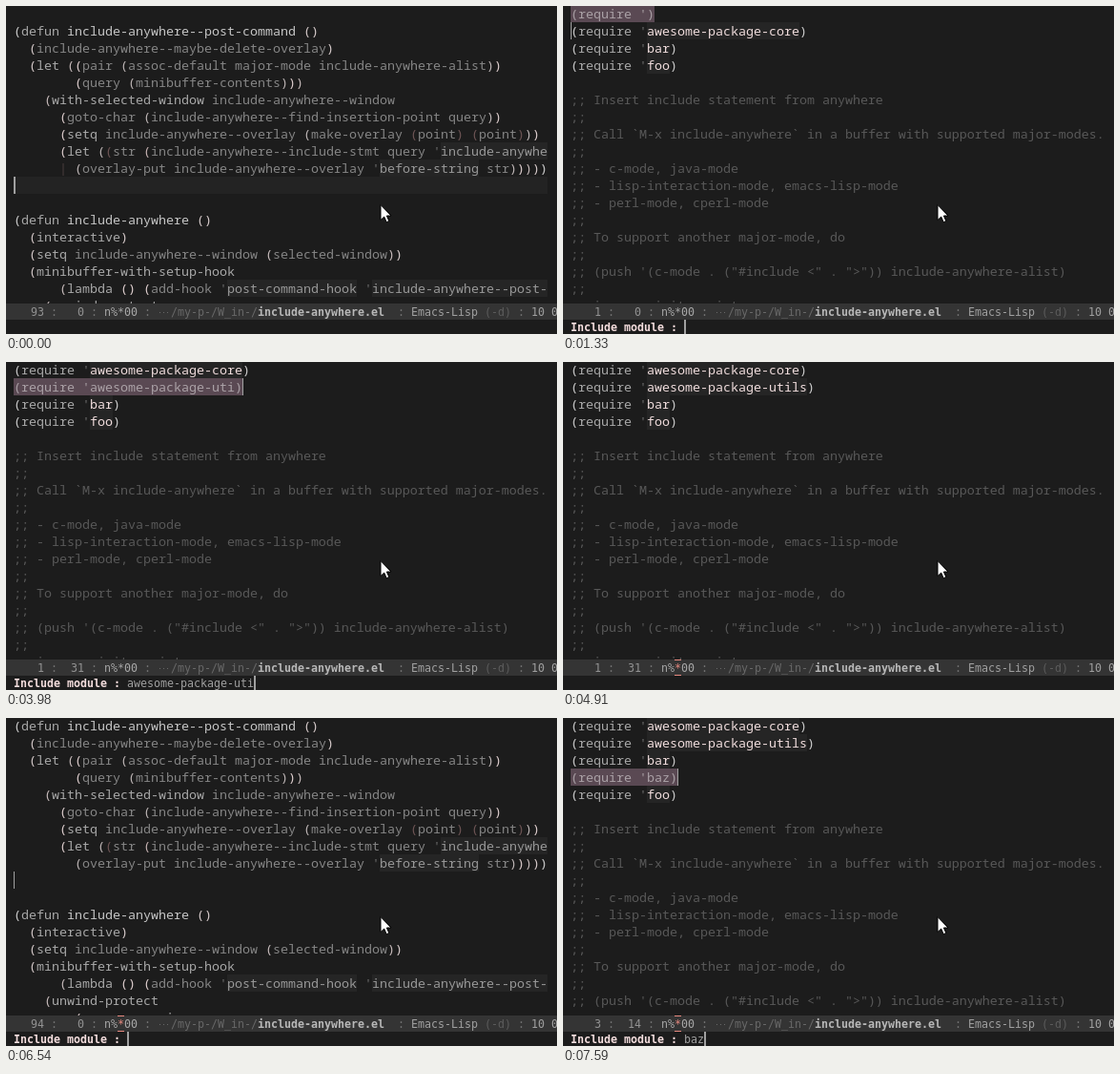
Animation, 578 px wide and 344 px high, one loop 8000 ms. Source, as an HTML page with a canvas:

```html
<!DOCTYPE html>
<html lang="en">
<head>
<meta charset="utf-8">
<title>Include anywhere</title>
<style>
html, body { margin: 0; width: 100%; height: 100%; overflow: hidden; background: #1c1c1c; }
canvas { display: block; }
</style>
</head>
<body>
<canvas id="stage" width="578" height="344"></canvas>
<script>
const ctx = document.getElementById('stage').getContext('2d');
const LOOP = 8000;
const LEFT = 8, RIGHT = 568, CW = 8, LH = 18, MODE_Y = 312, MINI_Y = 329;
const CODE_FONT = '13.333px "Noto Sans Mono", monospace';
const SMALL_FONT = '11.63px "DejaVu Sans Mono", monospace';
const C = {
  bg: '#1c1c1c', line: '#232323', box: '#252525', mode: '#343434',
  text: '#858585', keyword: '#a8a8a8', name: '#c6c6c6', quote: '#6c6c6c',
  quoted: '#989898', module: '#efdcdc', comment: '#585858', guide: '#4a3f3f',
  overlay: '#5a4953', overlayText: '#aaa1a6', cursor: '#a0a0a0', prompt: '#f5dede',
  alert: '#e88a80'
};
const PARENS = ['#d0d0d0', '#d8cccc', '#c8bcbc', '#e0d0d0', '#c0b8b8', '#6e5555', '#c8b4b4'];
const KEYWORDS = ['defun', 'let', 'setq', 'with-selected-window', 'interactive', 'lambda',
  'minibuffer-with-setup-hook', 'unwind-protect', 'save-excursion', 'require'];

const code = `
(defun include-anywhere--post-command ()
  (include-anywhere--maybe-delete-overlay)
  (let ((pair (assoc-default major-mode include-anywhere-alist))
        (query (minibuffer-contents)))
    (with-selected-window include-anywhere--window
      (goto-char (include-anywhere--find-insertion-point query))
      (setq include-anywhere--overlay (make-overlay (point) (point)))
      (let ((str (include-anywhere--include-stmt query 'include-anywhere-alist)))
        (overlay-put include-anywhere--overlay 'before-string str)))))


(defun include-anywhere ()
  (interactive)
  (setq include-anywhere--window (selected-window))
  (minibuffer-with-setup-hook
      (lambda () (add-hook 'post-command-hook 'include-anywhere--post-command))
    (unwind-protect
        (save-excursion`.split('\n');

const comments = `
;; Insert include statement from anywhere
;;
;; Call \`M-x include-anywhere\` in a buffer with supported major-modes.
;;
;; - c-mode, java-mode
;; - lisp-interaction-mode, emacs-lisp-mode
;; - perl-mode, cperl-mode
;;
;; To support another major-mode, do
;;
;; (push '(c-mode . ("#include <" . ">")) include-anywhere-alist)
;;
;; in your init script.`.split('\n');

const CORE = 'awesome-package-core', UTILS = 'awesome-package-utils';

// Split lisp lines into coloured pieces, carrying paren depth across lines.
function tokenize(lines) {
  let depth = 0;
  return lines.map(line => {
    const out = [];
    let last = '';
    for (const m of line.matchAll(/[()']|[^()'\s]+/g)) {
      const s = m[0], tok = { s, col: m.index };
      if (s === '(') tok.color = PARENS[depth++ % PARENS.length];
      else if (s === ')') tok.color = PARENS[--depth % PARENS.length];
      else if (s === "'") tok.color = C.quote;
      else if (last === "'") {
        tok.boxed = true;
        tok.color = line.startsWith('(require') ? C.module : C.quoted;
      }
      else if (last === 'defun') tok.color = C.name;
      else tok.color = KEYWORDS.includes(s) ? C.keyword : C.text;
      last = s;
      out.push(tok);
    }
    return out;
  });
}

const codeTokens = tokenize(code);
const requireLine = name => `(require '${name})`;
const rowTop = row => row * LH - 1;

function rect(color, x, y, w, h) {
  ctx.fillStyle = color;
  ctx.fillRect(x, y, w, h);
}

function codeText(s, col, row, color) {
  ctx.font = CODE_FONT;
  ctx.fillStyle = color;
  ctx.fillText(s, LEFT + col * CW, rowTop(row) + 14);
}

function drawTokens(tokens, row) {
  for (const t of tokens) {
    if (t.boxed) rect(C.box, LEFT + t.col * CW, rowTop(row), t.s.length * CW, LH);
    codeText(t.s, t.col, row, t.color);
  }
}

function drawCode(first, active) {
  const point = 10 - first;
  if (active) rect(C.line, LEFT, rowTop(point), RIGHT - LEFT, LH);
  codeTokens.slice(first).forEach(drawTokens);
  if (active) codeText('|', 6, point - 1, C.guide);
  rect(C.cursor, LEFT, rowTop(point), active ? 2 : 1, LH);
}

// Top of the buffer; the overlay line is sorted in among the modules.
function drawTop(modules, query) {
  const names = modules.slice();
  let at = -1;
  if (query !== null) {
    at = modules.filter(m => m < query).length;
    names.splice(at, 0, query);
  }
  names.forEach((name, row) => {
    const s = requireLine(name);
    if (row === at) {
      rect(C.overlay, LEFT, rowTop(row), s.length * CW, LH);
      codeText(s, 0, row, C.overlayText);
    } else drawTokens(tokenize([s])[0], row);
  });
  comments.forEach((s, i) => codeText(s, 0, names.length + i, C.comment));
  if (at === 0) rect(C.cursor, LEFT, rowTop(1), 1, LH);
  if (at > 0) rect(C.cursor, LEFT + requireLine(query).length * CW, rowTop(at), 1, LH);
  return at > 0 ? [at, requireLine(names[at - 1]).length] : [1, 0];
}

function small(s, x, y, color, bold) {
  ctx.font = (bold ? 'bold ' : '') + SMALL_FONT;
  ctx.fillStyle = color;
  ctx.fillText(s, x, y);
}

function drawModeLine([line, col], modified) {
  const put = (s, c, color, bold) => small(s, 5 + c * 7, 325, color, bold);
  rect(C.mode, 0, MODE_Y, 578, MINI_Y - MODE_Y);
  put(String(line).padStart(5), 0, '#929292');
  put(String(col).padStart(3), 8, '#929292');
  [6, 12, 20, 58, 76].forEach(c => put(':', c, '#727272'));
  put('n%', 14, '#a8a8a8');
  put('*', 16, modified ? C.alert : '#a8a8a8');
  put('00', 17, '#a8a8a8');
  if (modified) {
    rect(C.alert, 117, MODE_Y, 7, 1);
    rect(C.alert, 117, MINI_Y - 1, 7, 1);
  }
  for (let i = 0; i < 3; i++) rect('#686868', 161 + i * 4, 321, 1, 1);
  put('/my-p-/W_in-/', 24, '#686868');
  put('include-anywhere.el', 37, '#b8b8b8', true);
  put('Emacs-Lisp', 60, '#a0a0a0');
  put('(-d)', 71, '#5c5c5c');
  put('10 0', 78, '#a0a0a0');
}

function drawMini(prompt, input) {
  small(prompt, LEFT, 341, C.prompt, true);
  small(input, LEFT + prompt.length * 7, 341, '#a0a0a0');
  rect(C.cursor, LEFT + (prompt.length + input.length) * 7, MINI_Y, 2, 15);
}

function drawPointer() {
  ctx.beginPath();
  [[0, 0], [0, 16], [3.7, 12.6], [6.2, 18.2], [8.8, 17], [6.4, 11.5], [11, 11.5]]
    .forEach(([x, y]) => ctx.lineTo(393 + x, 208.5 + y));
  ctx.closePath();
  ctx.fillStyle = '#fff';
  ctx.fill();
  ctx.strokeStyle = '#000';
  ctx.lineWidth = 1;
  ctx.stroke();
}

// [time, characters typed]
const typeUtils = [[1330, 0], [1990, 1], [2120, 2], [2250, 3], [2520, 6], [2650, 8],
  [2910, 10], [3040, 12], [3170, 13], [3430, 15], [3560, 16], [3690, 17],
  [3850, 18], [3980, 19], [4250, 20], [4510, 21]];
const typeBaz = [[6670, 0], [7200, 1], [7330, 2], [7590, 3]];

function typed(word, keys, t) {
  const n = keys.filter(k => k[0] <= t).pop()[1];
  return word.slice(0, n);
}

function draw(t) {
  const modified = t >= 4910;
  const before = [CORE, 'bar', 'foo'], after = [CORE, UTILS, 'bar', 'foo'];
  let pos, prompt = null, input = '';

  rect(C.bg, 0, 0, 578, 344);
  ctx.save();
  ctx.beginPath();
  ctx.rect(0, 0, RIGHT, MODE_Y);
  ctx.clip();
  if (t < 1330) {
    drawCode(0, t < 660);
    pos = [93, 0];
    if (t >= 660) prompt = 'M-x ';
  } else if (t < 4910) {
    prompt = 'Include module : ';
    input = typed(UTILS, typeUtils, t);
    pos = drawTop(before, input);
  } else if (t < 5190) {
    drawTop(after, null);
    pos = [1, 31];
  } else if (t < 6670) {
    drawCode(1, t < 6140);
    pos = [94, 0];
    if (t >= 6140) prompt = t < 6540 ? 'M-x ' : 'Include module : ';
  } else {
    prompt = 'Include module : ';
    input = typed('baz', typeBaz, t);
    pos = drawTop(after, input);
  }
  ctx.restore();

  drawModeLine(pos, modified);
  if (prompt) drawMini(prompt, input);
  drawPointer();
}

const start = performance.now();
function tick() {
  draw((performance.now() - start) % LOOP);
  requestAnimationFrame(tick);
}
tick();
</script>
</body>
</html>
```
